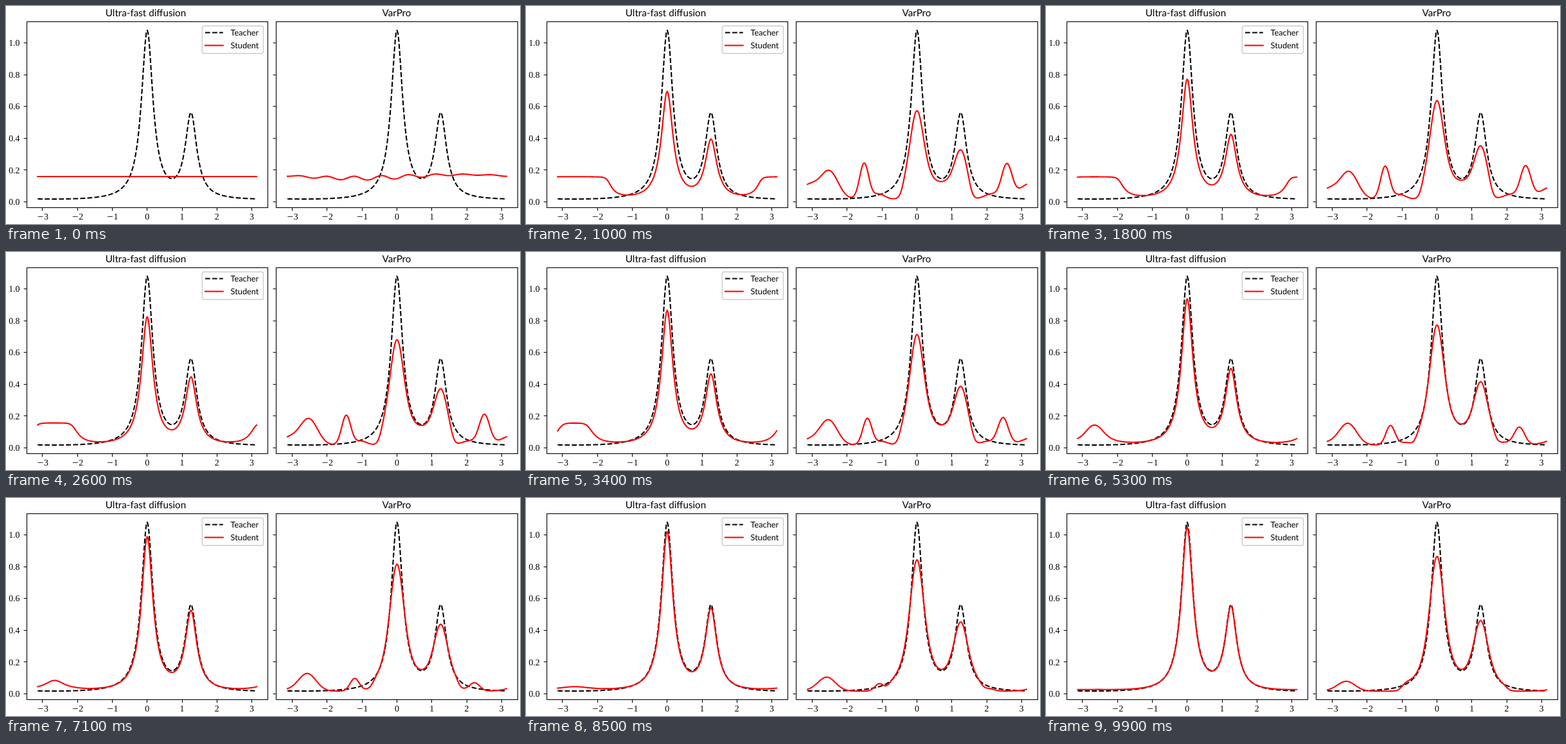
An HTML page for the animation above (10000 ms loop, 800 px wide and 340 px high).

```html
<!DOCTYPE html>
<html lang="en">
<head>
<meta charset="utf-8">
<title>Teacher and student densities</title>
<style>
  html, body { margin: 0; width: 100%; height: 100%; overflow: hidden; background: #fff; }
  svg { display: block; width: 100vw; height: 100vh; }
  text { text-rendering: geometricPrecision; }
  .title { font: 15.2px Lato, sans-serif; text-anchor: middle; }
  .label { font: 12.8px Lato, sans-serif; }
  .tick { font: 13.9px "Liberation Serif", serif; text-anchor: middle; }
  .minus { font: 17px "Liberation Serif", serif; text-anchor: middle; }
  .end { text-anchor: end; }
  .axis { fill: none; stroke: #000; stroke-width: 1.1; }
  .teacher, .student { fill: none; stroke-width: 2.08; stroke-linejoin: round; }
  .teacher { stroke: #000; stroke-dasharray: 7.71 3.33; }
  .student { stroke: #f00; stroke-linecap: square; }
</style>
</head>
<body>
<svg id="stage" viewBox="0 0 800 340"></svg>
<script>
const FRAMES = 100, FRAME_MS = 100;
const N = 256, MID = N / 2, PI = Math.PI, dx = 2 * PI / N;
const grid = Array.from({ length: N + 1 }, (_, i) => -PI + i * dx);
const lerp = (a, b, u) => a + (b - a) * u;
const mix = (a, b, u) => a.map((v, i) => lerp(v, b[i], u));

// Teacher: two wrapped Cauchy peaks
const GAMMA = 0.2;
const cauchy = x => Math.sinh(GAMMA) / (2 * PI * (Math.cosh(GAMMA) - Math.cos(x)));
const teacher = grid.map(x => (2 * cauchy(x) + cauchy(x - 0.4 * PI)) / 3);

// Left student: ultra-fast diffusion f_t = -2 (T (T/f)')', kept as snapshots up to a peak height
function diffuse(goal) {
  const f = new Float64Array(N).fill(1 / (2 * PI));
  const r = new Float64Array(N), flux = new Float64Array(N);
  const edge = grid.slice(0, N).map((_, i) => (teacher[i] + teacher[i + 1]) / 2);
  const snaps = [{ t: 0, f: Array.from(f) }];
  let t = 0, mark = f[MID];
  for (let step = 0; step < 4e5 && f[MID] < goal; step++) {
    let top = 0;
    for (let i = 0; i < N; i++) {
      r[i] = teacher[i] / f[i];
      if (r[i] > top) top = r[i];
    }
    const k = 0.2 / (top * top);
    for (let i = 0; i < N; i++) flux[i] = edge[i] * (r[(i + 1) % N] - r[i]);
    for (let i = 0; i < N; i++) f[i] -= 2 * k * (flux[i] - flux[(i + N - 1) % N]);
    t += k * dx * dx;
    if (f[MID] > mark * 1.003 || f[MID] >= goal) {
      mark = f[MID];
      snaps.push({ t, f: Array.from(f) });
    }
  }
  return snaps;
}

// The clock follows a power law through two known peak heights
const EARLY = { frame: 10, peak: 0.695 }, LAST = { frame: FRAMES - 1, peak: 1.049 };
const snaps = diffuse(LAST.peak);
const endTime = snaps[snaps.length - 1].t;
const earlyTime = snaps.find(s => s.f[MID] >= EARLY.peak).t;
const power = Math.log(earlyTime / endTime) / Math.log(EARLY.frame / LAST.frame);

function diffusion(frame) {
  const t = endTime * (frame / LAST.frame) ** power;
  const j = snaps.findIndex(s => s.t >= t);
  const hi = j < 0 ? snaps.length - 1 : Math.max(j, 1);
  const a = snaps[hi - 1], b = snaps[hi];
  const f = mix(a.f, b.f, Math.min(1, (t - a.t) / (b.t - a.t)));
  return [...f, f[0]];
}

// Right student: the left one blurred inside a widening window, with leftover bumps outside
function blur(values, sigma) {
  const reach = Math.ceil(4 * sigma / dx);
  return values.map((_, i) => {
    let sum = 0, total = 0;
    for (let j = -reach; j <= reach; j++) {
      const w = Math.exp(-0.5 * (j * dx / sigma) ** 2);
      sum += w * values[(i + j + N) % N];
      total += w;
    }
    return sum / total;
  });
}

const sigmoid = x => 1 / (1 + Math.exp(-x));
function bump(x, center, height, width) {
  const d = Math.abs(x - center), wrapped = Math.min(d, 2 * PI - d);
  return height * Math.exp(-0.5 * (wrapped / width) ** 2);
}

const ripple = x => 0.16 + 0.011 * Math.cos(x - 1.9)
  + 0.013 * (0.6 + 0.4 * Math.cos(x + 0.6)) * Math.cos(8 * (x + 0.45));

function projection(left, frame) {
  const s = frame / LAST.frame;
  const drift = 0.42 * s + 0.36 * s ** 4;
  const inLeft = -1.55 + 0.85 * drift, inRight = 2.62 - drift;
  const foot = 0.035 * (1 - s);
  const core = blur(left, 0.11);
  const model = grid.map((x, i) => {
    const open = sigmoid((x + 0.4 + 0.8 * drift) / 0.06) * sigmoid((1.52 + 0.65 * drift - x) / 0.06);
    return open * core[i] + (1 - open) * 0.017
      + bump(x, inLeft, 0.25 * (1 - 0.95 * s), 0.13)
      + bump(x, inLeft + 0.42, foot, 0.17)
      + bump(x, inRight, 0.22 * (1 - s * s) ** 2, 0.15)
      + bump(x, inRight - 0.45, foot, 0.2)
      + bump(x, -2.5 - 0.1 * s, 0.175 * (1 - 0.65 * s ** 1.7), 0.25)
      + bump(x, -3.1, 0.13 * Math.exp(-4 * s), 0.27)
      + bump(x, 0.7, 0.025 * (1 - s), 0.2);
  });
  const flat = 1 / (2 * PI);
  const settled = Math.min(1, (left[MID] - flat) / (EARLY.peak - flat));
  return mix(grid.map(ripple), model, settled);
}

// Drawing
const SCALE = 54.26, ZERO = 305.4, UNIT = 247.9, TOP = 24.5, BOTTOM = 314.5;
const panels = [{ left: 32.5, right: 407.5, mid: 219.75 }, { left: 420.5, right: 796.5, mid: 608.5 }];
const py = y => ZERO - y * UNIT;
const snap = v => Math.floor(v) + 0.5;
const trace = (values, mid) => "M" + values.map((v, i) =>
  (mid + grid[i] * SCALE).toFixed(2) + " " + py(v).toFixed(2)).join("L");

const stage = document.getElementById("stage");
function add(tag, attrs, text) {
  const el = document.createElementNS("http://www.w3.org/2000/svg", tag);
  for (const name in attrs) el.setAttribute(name, attrs[name]);
  if (text) el.textContent = text;
  return stage.appendChild(el);
}

const students = panels.map(({ left, right, mid }, side) => {
  add("path", { class: "teacher", d: trace(teacher, mid) });
  const line = add("path", { class: "student" });
  let ticks = "";
  for (let n = -3; n <= 3; n++) {
    const x = mid + n * SCALE;
    ticks += `M${snap(x)} ${BOTTOM}v4.9`;
    if (n < 0) add("text", { class: "minus", x: x - 3.5, y: 334 }, "−");
    add("text", { class: "tick", x: n < 0 ? x + 5.4 : x, y: 333 }, String(Math.abs(n)));
  }
  for (let n = 0; n <= 5; n++) {
    const y = py(n / 5);
    ticks += `M${left} ${snap(y)}h-4.9`;
    if (side === 0) add("text", { class: "tick end", x: 21.5, y: y + 4.7 }, (n / 5).toFixed(1));
  }
  add("path", { class: "axis", d: ticks });
  add("rect", { class: "axis", x: left, y: TOP, width: right - left, height: BOTTOM - TOP });
  return line;
});
add("text", { class: "title", x: 217.5, y: 16 }, "Ultra-fast diffusion");
add("text", { class: "title", x: 608, y: 16 }, "VarPro");

add("rect", {
  x: 305.3, y: 31, width: 95.2, height: 43, rx: 2.8,
  fill: "#fff", "fill-opacity": 0.8, stroke: "#ccc", "stroke-width": 1.39
});
["Teacher", "Student"].forEach((name, i) => {
  const y = 41.5 + 20 * i;
  add("path", { class: name.toLowerCase(), d: `M310 ${y}h27.8` });
  add("text", { class: "label", x: 349.5, y: y + 4.7 }, name);
});

const paths = Array.from({ length: FRAMES }, (_, frame) => {
  const left = diffusion(frame);
  return [left, projection(left, frame)].map((values, side) => trace(values, panels[side].mid));
});

let shown = -1;
function show(frame) {
  if (frame === shown) return;
  shown = frame;
  students.forEach((line, side) => line.setAttribute("d", paths[frame][side]));
}
show(0);
let origin = null;
function tick(now) {
  if (origin === null) origin = now;
  show(Math.floor(Math.max(0, now - origin) / FRAME_MS) % FRAMES);
  requestAnimationFrame(tick);
}
requestAnimationFrame(tick);
</script>
</body>
</html>
```
